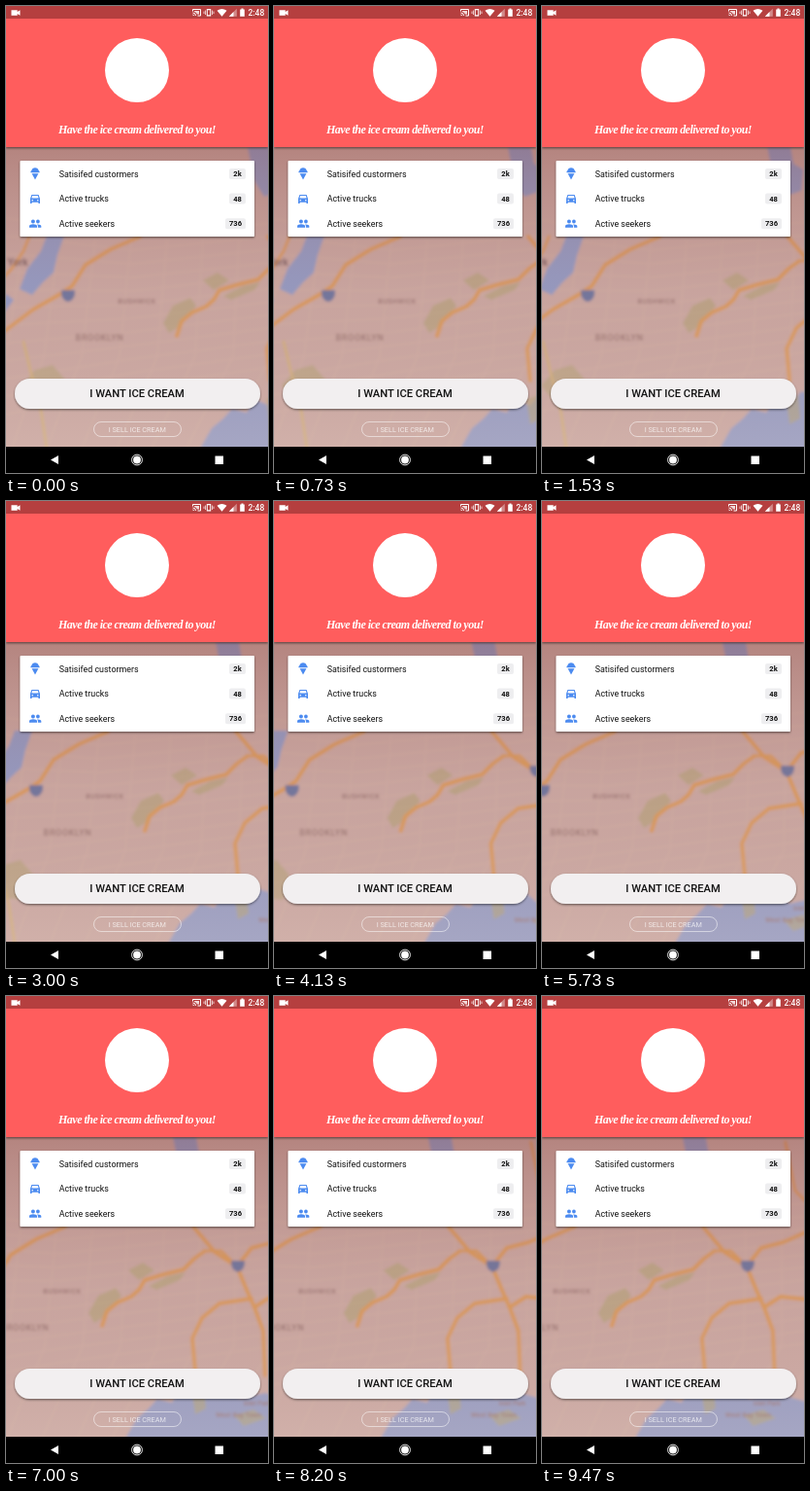
These frames come from a looping animation (270 px wide and 480 px high, 9.54 s). An HTML page:

```html
<!DOCTYPE html>
<html lang="en">
<head>
<meta charset="utf-8">
<style>
  html, body { margin: 0; width: 100%; height: 100%; overflow: hidden; background: #000; }
  svg { display: block; width: 100vw; height: 100vh; font-family: Roboto, sans-serif; }
  .road { fill: none; stroke: #dc9a58; stroke-width: 4; stroke-linecap: round; stroke-linejoin: round; }
  .street { fill: none; stroke: #d8b4aa; stroke-width: 1.5; opacity: .35; }
  .water { fill: #929bc6; }
  .park { fill: #b3a376; opacity: .6; }
  .label { fill: #977270; font-weight: 500; }
  .row { font-size: 8.9px; fill: #111; }
  .badge { font-size: 7.6px; font-weight: 700; fill: #111; text-anchor: middle; }
  .mid { text-anchor: middle; }
  .blue { fill: #4c8bf0; }
</style>
</head>
<body>
<svg viewBox="0 0 270 480">
  <defs>
    <filter id="blur" x="-5%" y="-5%" width="110%" height="110%"><feGaussianBlur stdDeviation="1.6"/></filter>
    <filter id="shadow" x="-10%" y="-20%" width="120%" height="150%">
      <feDropShadow dx="0" dy="1.2" stdDeviation="1.3" flood-opacity=".5"/>
    </filter>
    <linearGradient id="tint" x2="0" y2="1">
      <stop offset="0" stop-color="#8c4540" stop-opacity=".36"/>
      <stop offset=".5" stop-color="#b08078" stop-opacity=".1"/>
      <stop offset="1" stop-color="#e0c8bc" stop-opacity=".25"/>
    </linearGradient>
    <path id="cone" d="M-4.6-1.2A2 2 0 0 1-3.6-3.5A3.7 3.7 0 0 1 3.6-3.5A2 2 0 0 1 4.6-1.2ZM-3.4-.3H3.4L0 6Z"/>
    <path id="car" d="M-5 5V0L-3.6-4H3.6L5 0V5H3.4V3.6H-3.4V5ZM-3.6-.7H3.6L2.8-3H-2.8ZM-3.6 1.7a.8.8 0 1 0 1.6 0a.8.8 0 1 0-1.6 0M2 1.7a.8.8 0 1 0 1.6 0a.8.8 0 1 0-1.6 0" fill-rule="evenodd"/>
    <path id="people" d="M-4.1-2.2a2 2 0 1 0 4 0a2 2 0 1 0-4 0M1-2.2a1.9 1.9 0 1 0 3.8 0a1.9 1.9 0 1 0-3.8 0M-6 4V2.3Q-5.5.6-2 .6T2 2.3V4ZM2.9 4V2.2Q2.8 1.3 2 .7Q6 .5 6.3 2.3V4Z"/>
  </defs>

  <g id="map">
    <g filter="url(#blur)">
      <rect x="-20" y="130" width="420" height="340" fill="#cba8a3"/>
      <g id="streets"></g>
      <path class="water" d="M14 291L22 270 36 252 42 236H60L53 256 49 274 38 284 27 297ZM-20 318L0 296 8 302-4 318-20 326Z"/>
      <path class="water" d="M249 145H273L276 162 286 168 284 190 266 196 256 180Z"/>
      <path class="water" d="M201 453L212 434 224 424 233 414 248 418 256 404 272 411 284 396 304 402 318 414 344 408 380 418V460H201Z"/>
      <g class="park">
        <path d="M30 374L48 369 61 384 55 410 30 408 16 390Z"/>
        <path d="M162 326L172 308 190 300 196 308 181 328 168 336ZM203 282L218 274 230 282 214 292ZM224 298L244 288 262 284 256 292 232 302ZM268 404L281 400 283 424 272 430ZM312 431L332 425 345 434 322 442Z"/>
      </g>
      <g class="road">
        <path d="M-20 346L0 333 28 312 56 296 68 288 82 266 108 250 138 237"/>
        <path d="M-20 297L6 270 18 252 24 237" stroke-width="3"/>
        <path d="M176 339L181 324 192 315 206 309 214 302 220 292 240 286 260 281 271 270 282 262"/>
        <path d="M270 237L292 263 315 278 325 302 333 320 342 344 344 390"/>
        <path d="M315 278L330 259 353 253 380 241M330 311L297 316 279 331 269 352 272 385"/>
        <path d="M333 320L350 309 380 312"/>
        <path d="M282 262L299 262 315 278M355 150L365 200 380 215" stroke-width="3"/>
        <path d="M18 345L26 378 36 415 42 455" stroke="#d3b077" stroke-width="2.5"/>
      </g>
      <g fill="#6d759f">
        <path d="M57 292H71Q72 302 64 304Q56 302 57 292Z"/>
        <path d="M309 272H323Q324 281 316 284Q308 281 309 272Z"/>
      </g>
      <g class="label" font-size="9">
        <text class="mid" x="96.5" y="344" letter-spacing=".6">BROOKLYN</text>
        <text class="mid" x="135" y="306" font-size="7" letter-spacing=".5">BUSHWICK</text>
        <text x="-22" y="267" font-size="10.5" fill="#705058">New York</text>
        <text x="293" y="433" font-size="7">West Bay Town</text>
        <text x="322" y="421" font-size="6.5">Inlet Park</text>
      </g>
    </g>
  </g>
  <rect y="145" width="270" height="308" fill="url(#tint)"/>

  <g filter="url(#shadow)"><rect y="13" width="270" height="132" fill="#ff5d5d"/></g>
  <rect width="270" height="13" fill="#b53f3f"/>
  <circle cx="135" cy="66" r="33" fill="#fff"/>
  <text class="mid" x="135" y="131" fill="#fff" font-size="12" font-weight="700" font-style="italic" letter-spacing="-.52" style="font-family:'Liberation Serif',serif">Have the ice cream delivered to you!</text>

  <g fill="#fff">
    <path d="M5.5 4.2H11.7V6L14.5 4.2V9.8L11.7 8V9.8H5.5Z"/>
    <path d="M192.5 5.5V3.5H200.5V10H197.5M192.5 7A3 3 0 0 1 195.5 10M192.5 9A1 1 0 0 1 193.5 10" fill="none" stroke="#fff"/>
    <path d="M194 5H199V8.6H197Q196 6.4 194 6Z" opacity=".8"/>
    <path d="M206.8 3H211.2V10.5H206.8ZM207.8 4.2V9.2H210.2V4.2Z" fill-rule="evenodd"/>
    <path d="M205.5 4.5V9M212.5 4.5V9M204 5.5V8M214 5.5V8" stroke="#fff" stroke-width=".7"/>
    <path d="M217.5 4.7Q222.5 1.2 227.5 4.7L222.5 10.8ZM234.5 6.1V10.8H229.8Z"/>
    <path d="M237.8 2.8V10.8H229.8Z" opacity=".4"/>
    <path d="M241.2 3.4H242.5V2.4H244.5V3.4H245.8V10.8H241.2Z"/>
    <text x="249.5" y="10" font-size="8.5" font-weight="500">2:48</text>
  </g>

  <rect x="14.5" y="159" width="241.5" height="78" rx="1" fill="#fff" filter="url(#shadow)"/>
  <g id="rows"></g>

  <rect x="9" y="383" width="253" height="31" rx="15.5" fill="#f2eff0" filter="url(#shadow)"/>
  <text class="mid" x="135" y="402.2" font-size="11.2" font-weight="500" fill="#111">I WANT ICE CREAM</text>
  <rect x="90.5" y="427.5" width="90" height="15" rx="7.5" fill="none" stroke="#fff" stroke-opacity=".65" stroke-width=".8"/>
  <text class="mid" x="135.3" y="437.7" font-size="7.3" fill="#fff" fill-opacity=".75">I SELL ICE CREAM</text>

  <rect y="453" width="270" height="27" fill="#000"/>
  <g fill="#fff">
    <path d="M46 466.5L54 462V471Z"/>
    <circle cx="135" cy="466.5" r="3.9"/>
    <circle cx="135" cy="466.5" r="5.4" fill="none" stroke="#fff" stroke-width=".9"/>
    <rect x="215.5" y="462.5" width="8.5" height="8.5"/>
  </g>
</svg>
<script>
  const LOOP = 9540, SPEED = 0.011; // px per ms
  const map = document.getElementById('map');

  const rows = [
    ['cone', 'Satisifed custormers', '2k', 17],
    ['car', 'Active trucks', '48', 17],
    ['people', 'Active seekers', '736', 21]
  ];
  document.getElementById('rows').innerHTML = rows.map(([icon, label, count, width], i) => {
    const y = 172.5 + i * 25.6;
    return `<use href="#${icon}" class="blue" x="30" y="${y}"/>
      <text class="row" x="54.7" y="${y + 3.2}">${label}</text>
      <rect x="${247 - width}" y="${y - 5.5}" width="${width}" height="11" rx="2" fill="#eeeef0"/>
      <text class="badge" x="${247 - width / 2}" y="${y + 2.7}">${count}</text>`;
  }).join('');

  // Faint side streets crossing the map
  let streets = '';
  for (let i = 0; i < 12; i++) {
    const x = i * 36 - 30, y = 215 + i * 19;
    streets += `<path class="street" d="M${x} 455l${30 + i * 3}-95 ${18 - i * 2}-120M-20 ${y}l150 ${22 - i * 5} 260-${25 + i}"/>`;
  }
  document.getElementById('streets').innerHTML = streets;

  function draw() {
    const t = performance.now() % LOOP;
    map.setAttribute('transform', `translate(${-t * SPEED} 0)`);
    requestAnimationFrame(draw);
  }
  draw();
</script>
</body>
</html>
```
